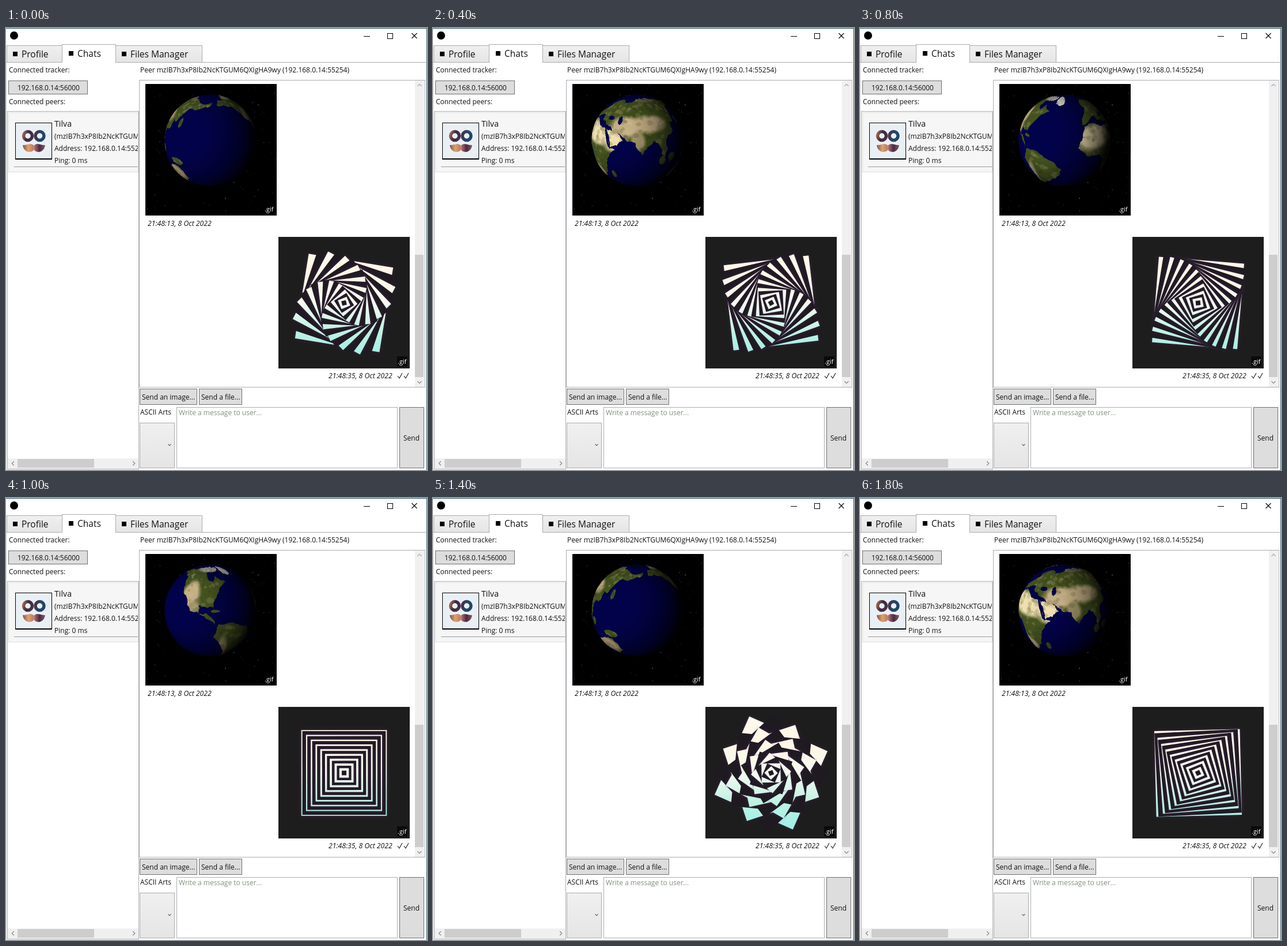
Animation of 731x766 px, one loop 1.9 s. Source, as an HTML page with a canvas:

```html
<!DOCTYPE html>
<html lang="en">
<head>
<meta charset="utf-8">
<title>Chat window</title>
<style>
html, body { margin: 0; width: 731px; height: 766px; overflow: hidden; background: #fff; }
canvas { display: block; }
</style>
</head>
<body>
<canvas id="stage" width="731" height="766"></canvas>
<script>
const ctx = document.getElementById('stage').getContext('2d');
const STEP = 100, STEPS = 19, RAD = Math.PI / 180;
const FONT = '"Open Sans", "Noto Sans", sans-serif';

let seed = 7;
const random = () => (seed = (seed * 16807) % 2147483647) / 2147483647;

function box(x, y, w, h, fill, border) {
  if (border) {
    ctx.fillStyle = border;
    ctx.fillRect(x, y, w, h);
    x++; y++; w -= 2; h -= 2;
  }
  ctx.fillStyle = fill;
  ctx.fillRect(x, y, w, h);
}

function text(str, x, y, size = 12, color = '#111', style = '') {
  ctx.font = `${style} ${size}px ${FONT}`;
  ctx.fillStyle = color;
  ctx.fillText(str, x, y);
}

function line(color, width, ...points) {
  ctx.strokeStyle = color;
  ctx.lineWidth = width;
  ctx.beginPath();
  for (const [x, y] of points) ctx.lineTo(x, y);
  ctx.stroke();
}

// Small arrow head pointing along (dx, dy).
function chevron(x, y, dx, dy, color, r = 3.5) {
  const back = ([sx, sy]) => [x - (dx - sx) * r / 2, y - (dy - sy) * r / 2];
  const tip = [x + dx * r / 2, y + dy * r / 2];
  line(color, 1.2, back([2 * dy, 2 * dx]), tip, back([-2 * dy, -2 * dx]));
}

function linear(x0, y0, x1, y1, ...colors) {
  const g = ctx.createLinearGradient(x0, y0, x1, y1);
  colors.forEach((c, i) => g.addColorStop(i / (colors.length - 1), c));
  return g;
}

// ---- Window ----
function drawFrame() {
  box(0, 0, 731, 766, '#fff');
  box(0, 0, 731, 1, '#1f4e66');
  box(730, 0, 1, 766, '#3d6678');
  box(0, 60, 1, 706, '#dcdcdc');
  ctx.fillStyle = '#000';
  ctx.beginPath();
  ctx.arc(14, 13, 7, 0, 7);
  ctx.fill();
  box(621, 14, 11, 1, '#000');
  box(662, 9, 10, 10, '#fff', '#000');
  line('#000', 1.1, [704.5, 9], [713.5, 18]);
  line('#000', 1.1, [713.5, 9], [704.5, 18]);
}

function drawTabs() {
  const shade = linear(0, 30, 0, 59, '#f0f0f0', '#e5e5e5');
  box(1, 30, 97, 30, shade, '#acacac');
  box(190, 30, 151, 30, shade, '#acacac');
  box(0, 59, 729, 1, '#acacac');
  box(97, 28, 94, 32, '#fff', '#acacac');
  box(98, 59, 92, 1, '#fff');
  for (const [label, x, y] of [['Profile', 12, 51], ['Chats', 109, 50], ['Files Manager', 201, 51]]) {
    box(x, y - 10, 8, 8, '#000');
    text(label, x + 15, y, 15.5);
  }
}

function drawAvatar() {
  box(16, 164, 64, 64, '#e9f0f5', '#000');
  box(16, 226, 64, 2, '#000');
  ctx.lineWidth = 5.5;
  ctx.strokeStyle = linear(28, 180, 69, 194, '#c07a45', '#3a2845', '#4a3048', '#1d4a6c', '#27405c');
  for (const x of [38, 58.5]) {
    ctx.beginPath();
    ctx.arc(x, 187, 7.5, 0, 7);
    ctx.stroke();
  }
  ctx.fillStyle = linear(29, 0, 68, 0, '#8a4f4a', '#dca468', '#b9766a', '#4a2848', '#8a5a58');
  for (const side of [-1, 1]) {
    const x = dx => 48.5 + side * dx;
    ctx.beginPath();
    ctx.moveTo(48.5, 204);
    ctx.bezierCurveTo(x(4.5), 198, x(10.5), 203, x(19.5), 203);
    ctx.bezierCurveTo(x(17.5), 217, x(3.5), 217, 48.5, 211);
    ctx.fill();
  }
}

function drawPeers() {
  text('Connected tracker:', 5, 77);
  box(4, 91, 138, 24, '#ddd', '#707070');
  text('192.168.0.14:56000', 20, 108, 11.9);
  text('Connected peers:', 5, 132);
  box(2, 144, 229, 621, '#fff', '#abadb3');
  box(4, 146, 226, 104, '#f6f6f6', '#dedede');
  drawAvatar();
  ctx.save();
  ctx.beginPath();
  ctx.rect(4, 146, 225, 104);
  ctx.clip();
  text('Tilva', 84, 171, 14.2);
  ['(mzIB7h3xP8Ib2NcKTGUM6QXIgHA9wy)', 'Address: 192.168.0.14:55254', 'Ping: 0 ms']
    .forEach((row, i) => text(row, 84, 192 + 21 * i));
  ctx.restore();
  box(14, 240, 215, 1, '#999');
  box(3, 746, 227, 18, '#f0f0f0');
  box(20, 747, 133, 15, '#cdcdcd');
  chevron(12, 754.5, -1, 0, '#888');
  chevron(222, 754.5, 1, 0, '#888');
}

function drawChat() {
  text('Peer mzIB7h3xP8Ib2NcKTGUM6QXIgHA9wy (192.168.0.14:55254)', 233, 77);
  box(231, 90, 497, 533, '#fff', '#abadb3');
  box(710, 91, 16, 531, '#f0f0f0');
  box(710, 393, 15, 212, '#cdcdcd');
  chevron(718, 99, 0, -1, '#aaa');
  chevron(718, 614, 0, 1, '#888');
  text('21:48:13, 8 Oct 2022', 246, 343, 12.2, '#111', 'italic');
  text('21:48:35, 8 Oct 2022', 560, 607, 12.2, '#111', 'italic');
  for (const x of [680, 691]) line('#222', 1.2, [x, 603], [x + 3, 607], [x + 8, 598]);
}

function drawComposer() {
  for (const [label, x, w] of [['Send an image...', 232, 100], ['Send a file...', 335, 75]]) {
    box(x, 625, w, 28, '#ddd', '#707070');
    text(label, x + 4, 644);
  }
  text('ASCII Arts', 233, 670);
  box(232, 684, 61, 79, linear(0, 684, 0, 762, '#f0f0f0', '#e5e5e5'), '#acacac');
  chevron(284, 722.3, 0, 1, '#606060', 2.5);
  box(296, 657, 384, 106, '#fff', '#abadb3');
  text('Write a message to user...', 300, 671, 12, '#82917f');
  box(683, 657, 43, 106, '#ddd', '#707070');
  text('Send', 690, 715);
}

// ---- Earth: coarse outlines as lon, lat pairs; the coast is roughened by rule ----
const AFRICA = [-6,35, 11,36, 32,31, 43,12, 51,12, 40,-5, 38,-18, 27,-34, 19,-35, 9,3, -8,5, -17,15];
const EURASIA = [-9,37, -2,47, 10,56, 6,62, 25,71, 60,68, 104,77, 186,67, 160,56, 138,54, 128,36, 122,38,
  121,27, 107,20, 108,11, 103,2, 92,22, 79,8, 72,21, 57,26, 36,34, 27,38, 14,44, 0,39];
const ARABIA = [34,30, 48,30, 59,22, 45,13];
const NORTH_AMERICA = [-166,62, -156,71, -95,69, -90,58, -79,53, -75,61, -56,52, -75,39, -81,26, -97,28,
  -96,19, -88,20, -79,8, -106,21, -124,42, -135,58];
const SOUTH_AMERICA = [-76,9, -52,4, -35,-7, -41,-22, -62,-40, -70,-54, -72,-20, -81,-5];
const AUSTRALIA = [114,-23, 130,-13, 142,-11, 153,-27, 146,-38, 116,-34];
// lon, lat, radii
const ISLANDS = [[-42,72,14,11], [-88,75,30,7], [47,-19,3,6], [113,1,5,5], [141,-5,9,4], [138,37,3,6], [-79,22,5,1.5], [101,0,4,5]];
const SEAS = [[35,43,6,2.5], [51,42,3,5], [16,41,3,4]];
// lon, lat, radii, colour
const SAND = '#f0e0b0', TAN = '#c4ae84', DRY = '#a09468', ICE = '#e0dcd4';
const REGIONS = [
  [5,23,34,15,SAND], [25,23,24,13,SAND], [47,22,19,15,SAND], [21,-25,12,13,TAN], [60,36,26,13,TAN],
  [90,39,28,11,TAN], [75,22,9,12,DRY], [100,72,50,6,'#77704c'], [-110,37,15,20,TAN], [-103,24,8,9,DRY],
  [-71,-25,7,24,DRY], [129,-25,27,17,TAN], [-42,73,38,17,ICE], [-92,76,45,10,'#bdb9ae']
];

function roughen(points, depth) {
  if (!depth) return points;
  const finer = points.flatMap(([x, y], i) => {
    const [nx, ny] = points[(i + 1) % points.length], bend = (random() - 0.5) * 0.28;
    return [[x, y], [(x + nx) / 2 + (ny - y) * bend, (y + ny) / 2 - (nx - x) * bend]];
  });
  return roughen(finer, depth - 1);
}

const pairs = list => list.flatMap((x, i) => i % 2 ? [] : [[x, list[i + 1]]]);
const oval = ([lon, lat, rx, ry]) => Array.from({ length: 8 },
  (_, i) => [lon + rx * Math.cos(i * Math.PI / 4), lat + ry * Math.sin(i * Math.PI / 4)]);

function makeEarthTexture() {
  const c = document.createElement('canvas');
  c.width = 720;
  c.height = 360;
  const g = c.getContext('2d');
  const OCEAN = '#02024a';
  const fillShape = (points, color) => {
    g.fillStyle = color;
    for (const wrap of [-720, 0, 720]) {
      g.beginPath();
      for (const [lon, lat] of points) g.lineTo((lon + 180) * 2 + wrap, (90 - lat) * 2);
      g.fill();
    }
  };
  const blob = (lon, lat, rx, ry, color, alpha = 'ff') => {
    const grad = g.createRadialGradient(0, 0, 0, 0, 0, 1);
    grad.addColorStop(0, color + alpha);
    grad.addColorStop(0.6, color + alpha);
    grad.addColorStop(1, color + '00');
    g.save();
    g.translate((lon + 180) * 2, (90 - lat) * 2);
    g.scale(rx * 2, ry * 2);
    g.fillStyle = grad;
    g.fillRect(-1, -1, 2, 2);
    g.restore();
  };
  const lands = [AFRICA, EURASIA, ARABIA, NORTH_AMERICA, SOUTH_AMERICA, AUSTRALIA].map(pairs);
  for (const land of [...lands, ...ISLANDS.map(oval)]) fillShape(roughen(land, 3), '#45531f');
  g.globalCompositeOperation = 'source-atop';
  REGIONS.forEach(r => blob(...r));
  for (let i = 0; i < 1500; i++) {
    const size = 1 + random() * 3;
    blob(random() * 360 - 180, random() * 140 - 55, size * 1.4, size, random() < 0.6 ? '#2a3610' : '#d8c890', '30');
  }
  g.globalCompositeOperation = 'source-over';
  SEAS.forEach(s => fillShape(roughen(oval(s), 2), OCEAN));
  fillShape([[33, 29], [36, 29], [44, 13], [42, 13]], OCEAN);
  g.globalCompositeOperation = 'destination-over';
  g.fillStyle = OCEAN;
  g.fillRect(0, 0, 720, 360);
  return g.getImageData(0, 0, 720, 360).data;
}

const GLOBE = { size: 164, radius: 80, distance: 4, tilt: 23 * RAD };

// Ray-cast every pixel of the disc once; only the longitude changes later.
function castGlobe() {
  const { size, radius, distance: d, tilt } = GLOBE;
  const scale = radius * Math.sqrt(d * d - 1), hits = [];
  for (let py = 0; py < size; py++) for (let px = 0; px < size; px++) {
    const u = (px + 0.5 - size / 2) / scale, v = (size / 2 - py - 0.5) / scale;
    const q = 1 + u * u + v * v, disc = d * d - q * (d * d - 1);
    if (disc < 0) continue;
    const ray = (d - Math.sqrt(disc)) / q;
    const x = u * ray, y = v * ray, z = d - ray;
    const lat = Math.asin(y * Math.cos(tilt) + z * Math.sin(tilt)) / RAD;
    const lon = Math.atan2(x, z * Math.cos(tilt) - y * Math.sin(tilt)) / RAD;
    const edge = Math.min(1, radius - Math.hypot(u, v) * scale + 0.3);
    const light = Math.min(1, Math.max(0.07, 1.1 * (-0.5 * x + 0.15 * y + 0.85 * z))) * edge;
    hits.push({ at: (py * size + px) * 4, row: Math.min(359, Math.floor((90 - lat) * 2)) * 720, lon, light });
  }
  return hits;
}

const earth = makeEarthTexture();
const hits = castGlobe();
const globe = document.createElement('canvas');
globe.width = globe.height = GLOBE.size;
const globeCtx = globe.getContext('2d');
const pixels = globeCtx.createImageData(GLOBE.size, GLOBE.size);
const stars = Array.from({ length: 170 }, () => {
  const level = 25 + random() ** 3 * 110;
  return { x: 242 + random() * 227, y: 97 + random() * 227, size: random() < 0.85 ? 1 : 1.6,
           color: `rgb(${level * 0.85},${level * 0.85},${level * (1 + random() * 0.4)})` };
});

function drawGlobe(centerLon) {
  box(242, 97, 228, 228, '#000');
  for (const s of stars) box(s.x, s.y, s.size, s.size, s.color);
  for (const { at, row, lon, light } of hits) {
    const from = (row + Math.floor((centerLon + lon + 1260) % 360 * 2)) * 4;
    for (let i = 0; i < 3; i++) pixels.data[at + i] = earth[from + i] * light;
    pixels.data[at + 3] = 255;
  }
  globeCtx.putImageData(pixels, 0, 0);
  ctx.drawImage(globe, 355 - GLOBE.size / 2, 195 - GLOBE.size / 2);
  text('.gif', 449, 318, 11, '#fff');
}

// ---- Twisting squares: each one turns a further `twist` degrees than the one around it ----
function square(half, degrees) {
  ctx.beginPath();
  for (let i = 0; i < 4; i++) {
    const a = (degrees + 45 + i * 90) * RAD, r = half * Math.SQRT2;
    ctx.lineTo(587 + r * Math.cos(a), 476.5 + r * Math.sin(a));
  }
  ctx.fill();
}

function drawTwist(twist) {
  ctx.save();
  ctx.beginPath();
  ctx.rect(473, 362, 228, 228);
  ctx.clip();
  box(473, 362, 228, 228, '#1e1d1e');
  const light = linear(0, 372, 0, 581, '#fffbee', '#fff6e6', '#f4faf0', '#bdf1e2', '#98eee8');
  for (let ring = 9, turn = twist; ring > 0; ring--) {
    ctx.shadowColor = 'rgba(110,40,130,0.4)';
    ctx.shadowBlur = 5;
    ctx.fillStyle = light;
    square(8.25 * ring, turn);
    ctx.shadowColor = 'transparent';
    ctx.fillStyle = '#1f1a22';
    square(8.55 * ring - 4.55, turn + twist);
    turn += 2 * twist;
  }
  box(679, 569, 18, 18, '#0a0a0a');
  text('.gif', 680, 582, 11, '#fff');
  ctx.restore();
}

// ---- Timing ----
const TWIST_PHASE = [[0, 0.295], [4, -0.264], [6, -0.5], [8, -0.766], [10, -1.03], [14, -1.595], [18, -2.157]];

function track(keys, step) {
  const i = Math.max(1, keys.findIndex(([at]) => at >= step));
  const [t0, v0] = keys[i - 1], [t1, v1] = keys[i];
  return v0 + (v1 - v0) * (step - t0) / (t1 - t0);
}

const easeInOutCubic = p => p < 0.5 ? 4 * p ** 3 : 1 - 4 * (1 - p) ** 3;

let shown = -1;
const start = performance.now();
function render() {
  const step = Math.floor((performance.now() - start) / STEP) % STEPS;
  if (step !== shown) {
    shown = step;
    const phase = track(TWIST_PHASE, step);
    drawGlobe(180 - 26.4 * step);
    drawTwist(90 * easeInOutCubic(phase - Math.floor(phase)));
  }
  requestAnimationFrame(render);
}

drawFrame();
drawTabs();
drawPeers();
drawChat();
drawComposer();
render();
</script>
</body>
</html>
```
